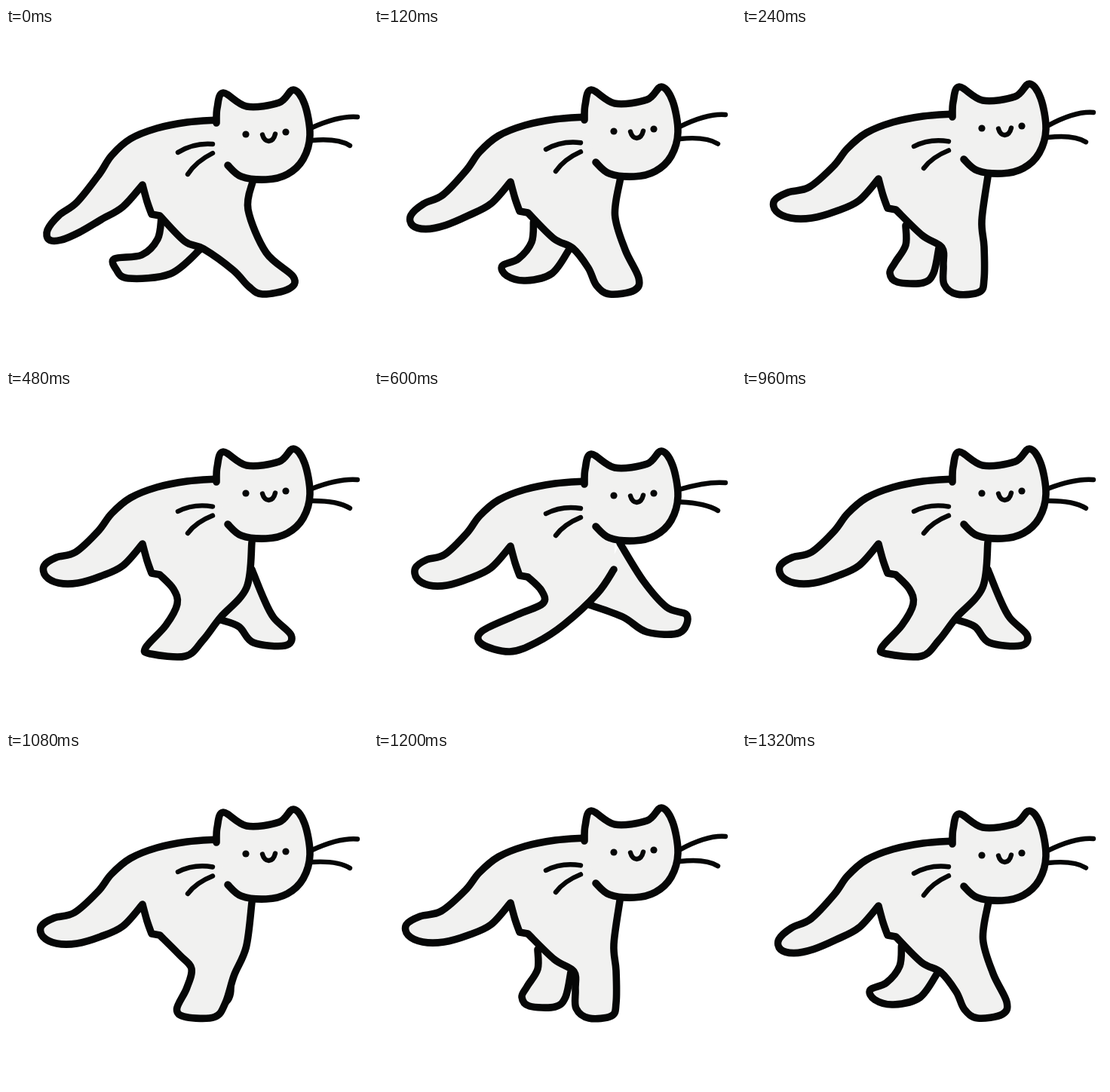
Animation of 480x443 px, one loop 1440 ms. Source, as an HTML page:

```html
<!DOCTYPE html>
<html lang="en">
<head>
<meta charset="utf-8">
<title>Walking cat</title>
<style>
  html, body { margin: 0; width: 100%; height: 100%; overflow: hidden; background: #fff; }
  svg { display: block; width: 100%; height: 100%; }
  path { fill: none; stroke: #060707; stroke-width: 9.6; stroke-linecap: round; stroke-linejoin: round; }
  .fur { fill: #f1f1f0; }
  .bare { stroke: none; }
  .thin { stroke-width: 6.4; }
  circle { fill: #060707; }
</style>
</head>
<body>
<svg viewBox="0 0 480 443">
  <path id="far" class="fur"/>
  <path id="fill" class="fur bare"/>
  <path id="body"/>
  <g id="head">
    <path id="face" class="fur"/>
    <circle cx="318" cy="141" r="4.6"/>
    <circle cx="371" cy="138" r="4.6"/>
    <path class="thin" d="M340 141.5C343 153 354 153 357 140.5"/>
  </g>
  <path id="whiskers" class="thin"/>
</svg>
<script>
const STEP = 120;
const $ = id => document.getElementById(id);
const points = text => text.trim().split(/\s+/).map(p => p.split(",").map(Number));
const mix = (a, b, t) => a.map((p, i) => p.map((v, k) => v + (b[i][k] - v) * t));

// Smooth curve through the points of each section, with corners where sections meet
function curve(...sections) {
  let last, d = "M" + sections[0][0];
  for (const section of sections) {
    const p = last ? [last, ...section] : section;
    for (let i = 0; i + 1 < p.length; i++) {
      const a = p[i], b = p[i + 1], before = p[i - 1] || a, after = p[i + 2] || b;
      const c1 = a.map((v, k) => v + (b[k] - before[k]) / 6);
      const c2 = b.map((v, k) => v - (after[k] - a[k]) / 6);
      d += `C${c1} ${c2} ${b}`;
    }
    last = p[p.length - 1];
  }
  return d;
}

// Back, tail leg and belly crease, shared by all poses
const torso = [
  "279,122 240,125 200,133 165,147 140,168 123,191 94,219 70,226 55,237 57,251 73,260 97,260 126,251 155,237 181,208",
  "187,230 193,247", "204,249"
].map(points);

// Each key: head lift, whisker sway; tail stretch, droop; near leg (10 points); far leg (8 points)
const [reach, stand, push, stride] = [
  `0,0 0,28
   237,283 262,293 301,321 322,343 340,353 375,346 381,330 345,298 321,241 327,204
   206,252 201,280 180,301 144,306 146,320 162,332 218,326 258,293`,
  `-8,-6 -11,0
   239,275 265,291 267,315 268,340 285,353 315,350 321,333 321,290 318,255 326,197
   217,262 217,288 203,311 196,325 206,337 240,338 254,325 261,292`,
  `-4,1 -4,0
   222,264 227,284 212,312 185,342 192,350 238,353 261,332 284,302 319,262 326,202
   285,305 309,314 328,335 370,339 378,325 355,302 341,275 326,238`,
  `-1,5 0,0
   222,266 224,283 190,298 143,320 143,337 180,347 215,335 252,311 296,270 318,238
   286,285 330,301 362,321 405,322 415,299 388,288 357,253 326,203`
].map(points);

const poses = [reach, mix(reach, stand, .5), stand, mix(stand, push, .5), push, stride, mix(push, stride, 1.3)];

// The tail bends more the further it is from the hip
function bend([x, y], lift, [stretch, droop]) {
  const t = (Math.max(0, 160 - x) / 100) ** 2;
  return [x + stretch * t, y + lift + droop * t];
}

const whiskers = (lift, sway) => {
  const inner = sway * .6, top = 118 + sway, low = 156 + sway * .8;
  return `M228 ${165 + lift}Q249 ${152 + (lift + inner) / 2} 274 ${154 + inner}` +
    `M241 ${194 + lift}Q252 ${177 + (lift + inner) / 2} 274 ${166 + inner}` +
    `M406 ${132 + lift / 3}Q442 ${top - 2} 466 ${top}` +
    `M406 ${149 + lift / 2}Q440 ${low - 10} 456 ${low}`;
};

$("face").setAttribute("d", curve(points(
  `279,126 280,106 288,86 319,104 362,99 381,82 396,101 403,142
   394,174 373,194 345,201 312,197 294,182`)));

function draw(now) {
  const step = Math.floor(now / STEP) % 12;
  const pose = poses[Math.min(step, 12 - step)]; // there and back
  const [[lift, sway], tail] = pose;
  const sections = torso.map(s => s.map(p => bend(p, lift, tail)));
  const body = curve(...sections, pose.slice(2, 12));
  $("far").setAttribute("d", curve(pose.slice(12)));
  $("body").setAttribute("d", body);
  $("fill").setAttribute("d", body + "L320 190");
  $("head").setAttribute("transform", `translate(0 ${lift})`);
  $("whiskers").setAttribute("d", whiskers(lift, sway));
}

let start;
function tick(now) {
  start ??= now;
  draw(now - start);
  requestAnimationFrame(tick);
}
draw(0);
requestAnimationFrame(tick);
</script>
</body>
</html>
```
